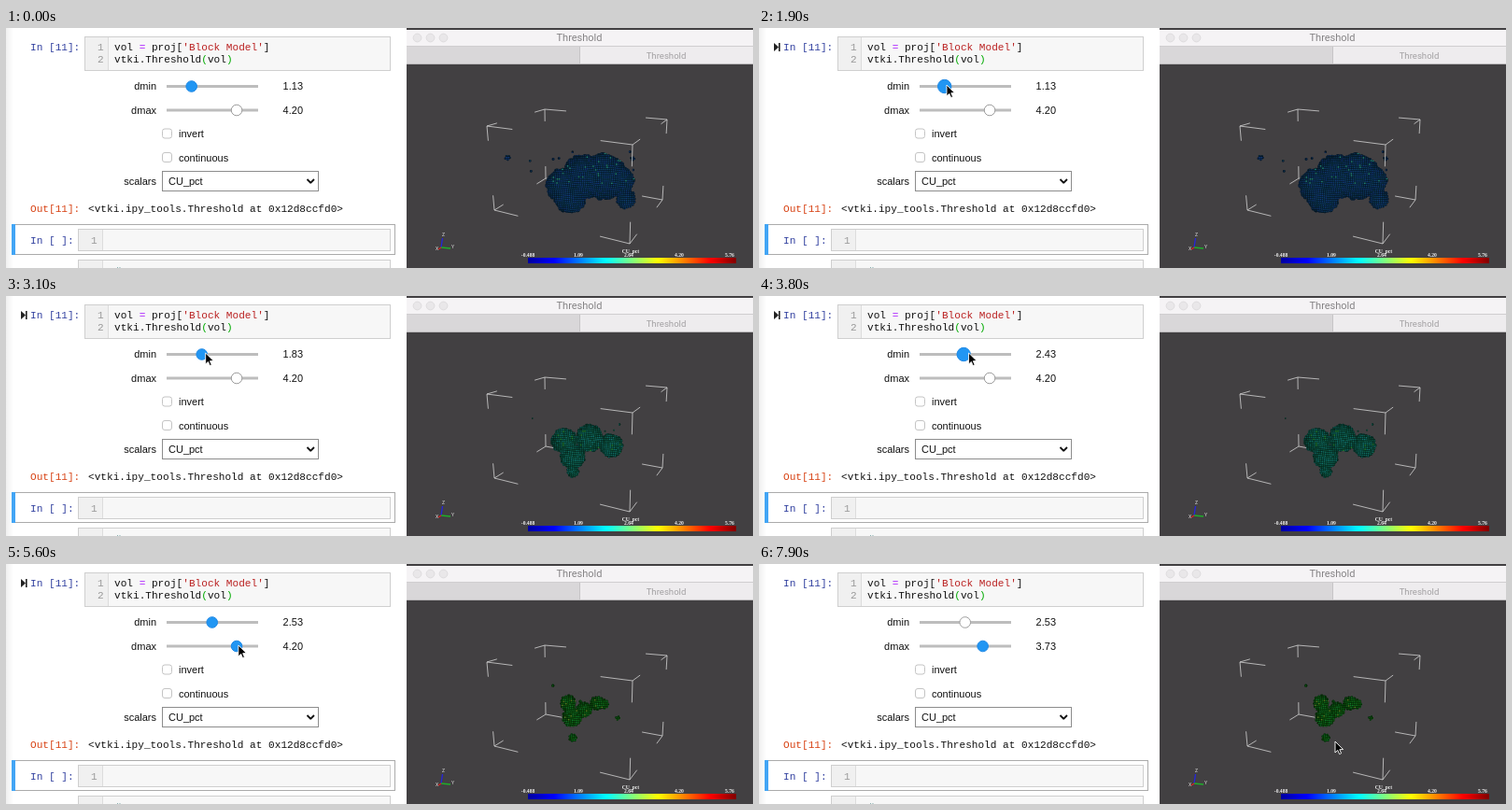
An HTML page with a canvas that plays this animation: 800 px wide and 257 px high, repeating every 8000 ms.

```html
<!DOCTYPE html>
<html lang="en">
<head>
<meta charset="utf-8">
<title>Threshold</title>
<style>
html, body { margin: 0; width: 100%; height: 100%; overflow: hidden; background: #fff; }
canvas { display: block; }
</style>
</head>
<body>
<canvas id="stage" width="800" height="257"></canvas>
<script>
const ctx = document.getElementById('stage').getContext('2d');
const LOOP = 8000;
const MONO = '11.1px "Liberation Mono", monospace';
const SANS = '11px "Liberation Sans", sans-serif';
const UI = 'Roboto, sans-serif';

const mix = (a, b, k) => a + (b - a) * k;
const between = (t, a, b) => t >= a && t < b;
function ease(t, start, end) {
  const k = Math.min(1, Math.max(0, (t - start) / (end - start)));
  return k * k * (3 - 2 * k);
}
function randomizer(seed) {
  return () => (seed = seed * 16807 % 2147483647) / 2147483647;
}

function text(s, x, y, font, color, align = 'left') {
  ctx.font = font;
  ctx.fillStyle = color;
  ctx.textAlign = align;
  ctx.fillText(s, x, y);
}

function rect(x, y, w, h, fill, stroke) {
  ctx.fillStyle = fill;
  ctx.fillRect(x, y, w, h);
  if (stroke) {
    ctx.strokeStyle = stroke;
    ctx.lineWidth = 1;
    ctx.strokeRect(x + .5, y + .5, w - 1, h - 1);
  }
}

function line(x1, y1, x2, y2, color, width = 1) {
  ctx.strokeStyle = color;
  ctx.lineWidth = width;
  ctx.beginPath();
  ctx.moveTo(x1, y1);
  ctx.lineTo(x2, y2);
  ctx.stroke();
}

function disc(x, y, r, fill, stroke) {
  ctx.beginPath();
  ctx.arc(x, y, r, 0, 7);
  ctx.fillStyle = fill;
  ctx.fill();
  ctx.strokeStyle = stroke;
  ctx.lineWidth = 1;
  ctx.stroke();
}

function polygon(points, fill) {
  ctx.beginPath();
  for (const [x, y] of points) ctx.lineTo(x, y);
  ctx.closePath();
  ctx.fillStyle = fill;
  ctx.fill();
}

// State of the interaction at time t
const handleX = value => 198.7 + (value - 1.13) * 15.75;

function stateAt(t) {
  const dmin = 1.13 + .7 * ease(t, 1900, 2500) + .7 * ease(t, 3400, 3925);
  const dmax = 4.2 - .47 * ease(t, 5700, 6400);
  const enter = ease(t, 300, 800), down = ease(t, 4700, 5300), leave = ease(t, 7000, 7600);
  const onMin = 201 + 1.15 * (handleX(dmin) - handleX(1.13));
  const x = mix(mix(230, mix(onMin, handleX(dmax) + 1.8, down), enter), 617, leave);
  const y = mix(mix(270, mix(61, 87, down), enter), 190, leave);
  return { t, dmin, dmax, x, y };
}

function codeBox(x, y, h, gutter) {
  rect(x, y, 412 - x, h, '#f7f7f7', '#cfcfcf');
  rect(x + 1, y + 1, gutter, h - 2, '#f0f0f0');
  line(x + gutter + 1.5, y + 1, x + gutter + 1.5, y + h - 1, '#dcdcdc');
}

function code(parts, y) {
  let x = 116;
  for (const [s, color] of parts) {
    text(s, x, y, MONO, color);
    x += s.length * 6.66;
  }
}

function slider(label, y, value, focused, dragged) {
  text(label, 161, y + 3.5, SANS, '#111', 'right');
  rect(172, y - 1.5, 98, 3, '#bdbdbd');
  disc(handleX(value), y, dragged ? 7.2 : 5.8, focused ? '#2196f3' : '#fff', focused ? '#1e88e5' : '#9e9e9e');
  text(value.toFixed(2), 318, y + 3.5, SANS, '#111', 'right');
}

function checkbox(label, y) {
  ctx.beginPath();
  ctx.roundRect(167.5, y - 5.5, 10, 10, 2.5);
  ctx.strokeStyle = '#c4c4c4';
  ctx.lineWidth = 1;
  ctx.stroke();
  text(label, 185, y + 3.5, SANS, '#111');
}

function notebook({ t, dmin, dmax, x, y }) {
  rect(0, 0, 429, 257, '#fff');
  const edge = ctx.createLinearGradient(0, 0, 8, 0);
  edge.addColorStop(0, '#f0f0f0');
  edge.addColorStop(1, '#fff');
  rect(0, 0, 8, 257, edge);

  text('In [11]:', 26, 24, MONO, '#303f9f');
  codeBox(84, 9, 37, 24);
  text('1', 98, 24, MONO, '#999');
  text('2', 98, 37.3, MONO, '#999');
  code([['vol ', '#111'], ['= ', '#a2f'], ['proj[', '#111'], ["'Block Model'", '#ba2121'], [']', '#111']], 24);
  code([['vtki.Threshold', '#111'], ['(', '#0a0'], ['vol', '#111'], [')', '#0a0']], 37.3);

  if (x < 416 && y < 208) {
    polygon([[16, 16], [21, 20.5], [16, 25]], '#222');
    rect(21, 16, 1.6, 9, '#222');
  }

  slider('dmin', 62.5, dmin, t < 5650, between(t, 1900, 2600) || between(t, 3400, 4200));
  slider('dmax', 88, dmax, t > 5550, between(t, 5650, 6700));
  checkbox('invert', 113.5);
  checkbox('continuous', 139);

  text('scalars', 161, 168, SANS, '#111', 'right');
  rect(167, 153, 168, 22, '#fff', '#8c8c8c');
  text('CU_pct', 174, 168, SANS, '#111');
  line(322.5, 162, 326.5, 166, '#111', 1.8);
  line(326, 166, 330, 162, '#111', 1.8);

  text('Out[11]:', 26, 197.3, MONO, '#d84315');
  text('<vtki.ipy_tools.Threshold at 0x12d8ccfd0>', 88, 197.3, MONO, '#111');

  rect(6, 210, 411, 33, '#fff', '#ababab');
  rect(6, 210, 4, 33, '#42a5f5');
  text('In [ ]:', 26, 231, MONO, '#303f9f');
  codeBox(77, 215, 24, 25);
  text('1', 91, 231, MONO, '#999');
  codeBox(77, 248, 20, 25);
  text('#', 116, 263, 'italic ' + MONO, '#408080');
}

// Each body is a union of lobes: x, y, radius
const BODIES = [
  { hue: 209, chips: 9, lobes: [[596, 168, 17], [604, 181, 17], [620, 159, 23], [640, 159, 24], [656, 163, 16],
    [664, 183, 10], [537, 139, 2.5], [671, 140, 2]] },
  { hue: 168, chips: 5, lobes: [[598, 155, 13], [607, 172, 13], [607, 188, 6], [625, 152, 14], [648, 160, 12]] },
  { hue: 125, chips: 2, lobes: [[602, 149, 8], [606, 164, 10], [607, 186, 4], [619, 156, 8], [633, 149, 7],
    [640, 150, 5], [655, 165, 2]] }
];

function outline(lobes, chips, random) {
  const path = new Path2D();
  const add = (x, y, r) => {
    path.moveTo(x + r, y);
    path.arc(x, y, r, 0, 7);
  };
  for (const [x, y, r] of lobes) {
    add(x, y, r);
    // Small bumps around the rim
    for (let a = 0; a < 6.2; a += 3.5 / r) {
      const d = r * .93;
      add(x + d * Math.cos(a), y + d * Math.sin(a), 1 + random() * r * .13);
    }
  }
  for (let i = 0; i < chips; i++) add(mix(560, 676, random()), mix(130, 155, random()), .8 + random());
  return path;
}

function mesh({ hue, chips, lobes }) {
  const random = randomizer(77);
  ctx.save();
  ctx.clip(outline(lobes, chips, random));
  rect(530, 110, 160, 100, `hsl(${hue} 75% 6%)`);
  for (let y = 120; y < 204; y += 2.1) {
    for (let x = 532; x < 682; x += 2.1) {
      const r = random();
      const bulge = Math.max(0, ...lobes.map(([u, v, s]) => 1 - ((x - u) ** 2 + (y - v) ** 2) / (s * s)));
      const glint = random() < .05 && y < 168;
      const light = 12 + 9 * r + 8 * Math.sqrt(bulge);
      ctx.fillStyle = glint ? `hsl(${hue - 35} 60% 32%)` : `hsl(${hue + 16 * (r - .5)} 75% ${light}%)`;
      ctx.fillRect(x + Math.sin(y / 6), y + Math.sin(x / 8), 1.6, 1.5);
    }
  }
  ctx.restore();
}

// Bounding box, only the ends of its edges are drawn
const TOP = [[515, 105], [577, 87], [708, 98], [671, 125]];
const BOTTOM = [[523, 195], [578, 161], [703, 184], [668, 231]];

function corner(ring, other, i) {
  const [x, y] = ring[i], k = i === 3 ? .22 : .175;
  for (const [u, v] of [ring[(i + 1) % 4], ring[(i + 3) % 4], other[i]]) {
    line(x, y, mix(x, u, k), mix(y, v, k), '#d4d4d4', .8);
  }
}

function colorBar() {
  const jet = ctx.createLinearGradient(559, 0, 782, 0);
  ['#00f', '#0ff', '#ff0', '#f00'].forEach((c, i) => jet.addColorStop(.125 + i / 4, c));
  jet.addColorStop(0, '#0000a0');
  jet.addColorStop(1, '#800000');
  rect(559, 246, 223, 6, jet);
  const font = 'bold 5.6px "Liberation Serif", serif';
  text('CU_pct', 669, 240.5, font, '#eee', 'center');
  ['-0.488', '1.09', '2.64', '4.20', '5.76'].forEach((s, i) =>
    text(s, 559 + i * 54, 244.5, font, '#eee', 'center'));
}

function axes() {
  const font = '5px ' + UI;
  const axis = (name, x, y, color, tx, ty) => {
    line(466, 235, x, y, color, 1.3);
    text(name, tx, ty, font, '#ddd', 'center');
  };
  axis('Z', 467.5, 225, '#2424e0', 468.5, 222.5);
  axis('Y', 476, 236, '#1fae2a', 478.5, 236);
  axis('X', 463, 237, '#d22', 461.5, 237.5);
}

function plot({ t }) {
  rect(429, 0, 371, 257, '#424042');
  rect(429, 2, 371, 18, '#f5f3f5');
  for (let i = 0; i < 3; i++) disc(440.5 + i * 14, 10.5, 4.4, '#e9e7e9', '#dedcde');
  text('Threshold', 614, 14, '11px ' + UI, '#858385', 'center');
  rect(429, 20, 185, 19, '#d9d7d9');
  rect(614, 20, 186, 19, '#eeecee');
  line(429, 19.5, 800, 19.5, '#d0ced0');
  line(614.5, 20, 614.5, 39, '#c6c4c6');
  line(429, 38.5, 800, 38.5, '#bcbabc');
  text('Threshold', 707, 33, '9.6px ' + UI, '#a3a1a3', 'center');

  corner(BOTTOM, TOP, 1);
  mesh(BODIES[(t >= 2800) + (t >= 4500)]);
  TOP.forEach((_, i) => {
    corner(TOP, BOTTOM, i);
    if (i !== 1) corner(BOTTOM, TOP, i);
  });
  axes();

  // The bar vanishes briefly while the scene is rebuilt.
  if (!between(t, 2690, 2800) && !between(t, 4400, 4500)) colorBar();
}

function pointer({ x, y }) {
  ctx.save();
  ctx.translate(x, y);
  polygon([[0, 0], [0, 12], [2.8, 9.4], [4.6, 13.6], [6.6, 12.7], [4.8, 8.7], [8.6, 8.5]], '#000');
  ctx.strokeStyle = '#fff';
  ctx.lineWidth = .9;
  ctx.stroke();
  ctx.restore();
}

function frame(now) {
  const state = stateAt(now % LOOP);
  notebook(state);
  plot(state);
  pointer(state);
  requestAnimationFrame(frame);
}
requestAnimationFrame(frame);
</script>
</body>
</html>
```
